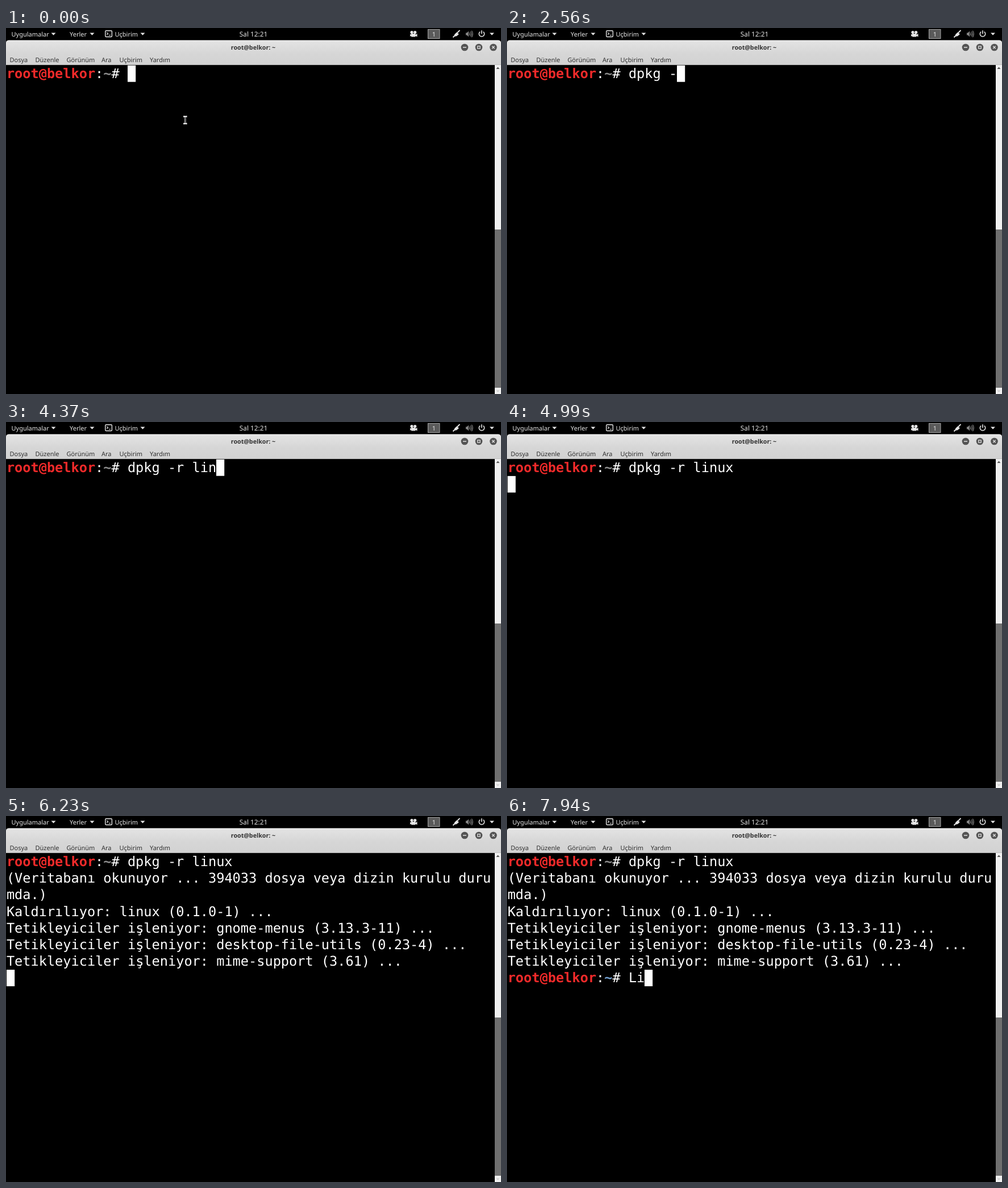
Animation of 871 by 643 pixels, one loop 8000 ms. Source, as an HTML page:

```html
<!DOCTYPE html>
<html lang="tr">
<head>
<meta charset="utf-8">
<title>Uçbirim</title>
<style>
  html, body { margin: 0; width: 100%; height: 100%; overflow: hidden; background: #000; }
  svg { display: block; width: 871px; height: 643px; }
  text { white-space: pre; text-rendering: geometricPrecision; }
  .ui { font: 11px "Noto Sans", "Open Sans", sans-serif; }
  .panel { fill: #e6e6e6; }
  .menu { fill: #303030; }
  .term { font: 23.6px "DejaVu Sans Mono", monospace; fill: #fff; }
  .user { font-weight: bold; fill: #f02a2a; }
  .path { font-weight: bold; fill: #8c8c8c; }
  .path.blue { fill: #729fcf; }
</style>
</head>
<body>
<svg viewBox="0 0 871 643">
  <defs>
    <linearGradient id="bar" x2="0" y2="1">
      <stop offset="0" stop-color="#e4e4e4"/>
      <stop offset=".55" stop-color="#d6d6d6"/>
      <stop offset="1" stop-color="#d2d2d2"/>
    </linearGradient>
    <path id="drop" d="M-4-2H4L0 2.2Z"/>
    <circle id="button" r="6.3" fill="#545454"/>
  </defs>
  <rect width="871" height="643"/>

  <g class="ui panel">
    <text x="9.5" y="15">Uygulamalar</text>
    <text x="112" y="15">Yerler</text>
    <text x="191.5" y="15">Uçbirim</text>
    <text x="435.5" y="15" text-anchor="middle" font-size="11.8">Sal 12:21</text>
    <use href="#drop" x="83.5" y="10.5"/>
    <use href="#drop" x="151.5" y="10.5"/>
    <use href="#drop" x="240.5" y="10.5"/>
    <use href="#drop" x="855" y="10.5"/>
    <g fill="none" stroke="#e6e6e6" stroke-width="1.4">
      <rect x="174.8" y="4.7" width="11.6" height="10.8" rx="1.5"/>
      <path d="M177.3 8l2.3 2-2.3 2M181 12.7h3" stroke-width="1.1"/>
      <path d="M834.2 6.6a4.7 4.7 0 1 0 5.6 0M837 4.2v6" stroke-width="1.6"/>
    </g>
    <circle cx="714" cy="7.5" r="2.6"/>
    <circle cx="719.7" cy="7.5" r="2.6"/>
    <path d="M713 10h7.5v5.5H713ZM711 10.5l2 1v2l-2 1.5ZM720 12l3.5-2v5.5l-3.5-2Z"/>
    <rect x="742.5" y="2.5" width="20.5" height="16" fill="#5a5a5a" stroke="#a8a8a8"/>
    <text x="753" y="15" text-anchor="middle">1</text>
    <path d="M786.5 16.5l4-4M794 8.5l4.5-4.5" fill="none" stroke="#e6e6e6" stroke-width="1.8"/>
    <path d="M789 11.5l4-4 4 3.2-4 3.6-3.5.5Z"/>
    <g fill="none" stroke="#858585" stroke-width="1.2">
      <path d="M809 8.5h2l3-3v10l-3-3h-2Z" fill="#858585" stroke="none"/>
      <path d="M815.5 8q1.6 2.5 0 5M817.5 6.3q2.7 4.2 0 8.4M819.4 4.8q3.6 5.7 0 11.4"/>
    </g>
  </g>

  <path d="M0 65V26Q0 21.5 5 21.5H866Q871 21.5 871 26V65Z" fill="url(#bar)"/>
  <path d="M4 22.3H867" stroke="#f2f2f2"/>
  <path d="M0 64.6H871" stroke="#b8b8b8" stroke-width=".8"/>
  <g class="ui menu">
    <text x="435" y="38" text-anchor="middle" font-weight="bold" font-size="10.7">root@belkor: ~</text>
    <text x="6.5" y="60">Dosya</text>
    <text x="51.5" y="60">Düzenle</text>
    <text x="106.5" y="60">Görünüm</text>
    <text x="168" y="60">Ara</text>
    <text x="199.5" y="60">Uçbirim</text>
    <text x="253" y="60">Yardım</text>
  </g>
  <use href="#button" x="807" y="34"/>
  <use href="#button" x="832" y="34"/>
  <use href="#button" x="857.5" y="34"/>
  <path d="M804 34h6M829.8 31.8h4.4v4.4h-4.4ZM855.3 31.8l4.4 4.4m0-4.4l-4.4 4.4" fill="none" stroke="#e2e2e2" stroke-width="1.3"/>

  <rect x="860" y="65" width="11" height="578" fill="#f0f0f0"/>
  <rect x="860" y="354" width="11" height="278" fill="#6f6f6f"/>
  <path d="M862.5 72h6l-3-3.5Z" fill="#555"/>
  <path d="M862.5 636.5h6l-3 3.5Z" fill="#d0d0d0"/>

  <g id="terminal" class="term"></g>
  <rect id="cursor" width="14.2" height="29" fill="#fff"/>
  <g id="pointer" fill="none">
    <path d="M312 155.5h2.2l1.1 1 1.1-1h2.2M312 168h2.2l1.1-1 1.1 1h2.2M315.3 156v12" stroke="#e8e8e8" stroke-width="2.6"/>
    <path d="M315.3 157v10" stroke="#000"/>
  </g>
</svg>
<script>
const LOOP = 8000, CELL_W = 14.2, CELL_H = 29.2, LEFT = 0.9, TOP = 65.7;
const PROMPT_COLS = 15, READING = "(Veritabanı okunuyor ... ";
const ENTER = 4990, DATABASE_READ = 5620, REMOVED = 6230, NEXT_PROMPT = 6540;
const POINTER_HIDE = 380;

const firstCommand = {
  text: "dpkg -r linux",
  keys: [300, 780, 1020, 1250, 2270, 2560, 2740, 2880, 3820, 4050, 4370, 4520, 4690]
};
const secondCommand = { text: "Li", keys: [7630, 7940] };
const progress = [[5070, "5%"], [5150, "45%"], [5300, "65%"], [5450, "85%"], [5540, "100%"]];
const cursorOff = [[1870, 2270], [3430, 3750], [DATABASE_READ, REMOVED], [6690, 7390]];

const terminal = document.getElementById("terminal");
const cursor = document.getElementById("cursor");
const pointer = document.getElementById("pointer");

function addText(parent, row, col, content = "", style = "") {
  const node = document.createElementNS("http://www.w3.org/2000/svg", "text");
  node.setAttribute("x", LEFT + col * CELL_W);
  node.setAttribute("y", TOP + 22.3 + row * CELL_H);
  node.setAttribute("class", style);
  node.textContent = content;
  parent.append(node);
  return node;
}

function addGroup() {
  const group = document.createElementNS("http://www.w3.org/2000/svg", "g");
  terminal.append(group);
  return group;
}

function addPrompt(row, pathStyle) {
  const group = addGroup();
  addText(group, row, 0, "root@belkor", "user");
  addText(group, row, 11, ":");
  addText(group, row, 12, "~", pathStyle);
  addText(group, row, 13, "#");
  return group;
}

addPrompt(0, "path");
const firstInput = addText(terminal, 0, PROMPT_COLS);
const readingLine = addText(terminal, 1, 0);
const wrappedLine = addText(terminal, 2, 0, "mda.)");
const removal = addGroup();
[
  "Kaldırılıyor: linux (0.1.0-1) ...",
  "Tetikleyiciler işleniyor: gnome-menus (3.13.3-11) ...",
  "Tetikleyiciler işleniyor: desktop-file-utils (0.23-4) ...",
  "Tetikleyiciler işleniyor: mime-support (3.61) ..."
].forEach((line, i) => addText(removal, 3 + i, 0, line));
const nextPrompt = addPrompt(7, "path blue");
const secondInput = addText(terminal, 7, PROMPT_COLS);

const show = (node, visible) => { node.style.visibility = visible ? "visible" : "hidden"; };
const typed = ({ text, keys }, t) => text.slice(0, keys.filter(key => key <= t).length);

function readingText(t) {
  if (t >= DATABASE_READ) return READING + "394033 dosya veya dizin kurulu duru";
  const step = progress.filter(([start]) => start <= t).pop();
  return step ? READING + step[1] : "";
}

function cursorCell(t, first, reading, second) {
  if (t < ENTER) return [0, PROMPT_COLS + first.length];
  if (t < DATABASE_READ) return [1, reading.length];
  return [7, t < NEXT_PROMPT ? 0 : PROMPT_COLS + second.length];
}

function render(t) {
  const first = typed(firstCommand, t), second = typed(secondCommand, t), reading = readingText(t);
  firstInput.textContent = first;
  secondInput.textContent = second;
  readingLine.textContent = reading;
  show(wrappedLine, t >= DATABASE_READ);
  show(removal, t >= REMOVED);
  show(nextPrompt, t >= NEXT_PROMPT);
  show(pointer, t < POINTER_HIDE);

  const [row, col] = cursorCell(t, first, reading, second);
  cursor.setAttribute("x", Math.round(LEFT + col * CELL_W));
  cursor.setAttribute("y", TOP + row * CELL_H);
  show(cursor, !cursorOff.some(([from, to]) => t >= from && t < to));
}

function tick() {
  render(performance.now() % LOOP);
  requestAnimationFrame(tick);
}
tick();
</script>
</body>
</html>
```
